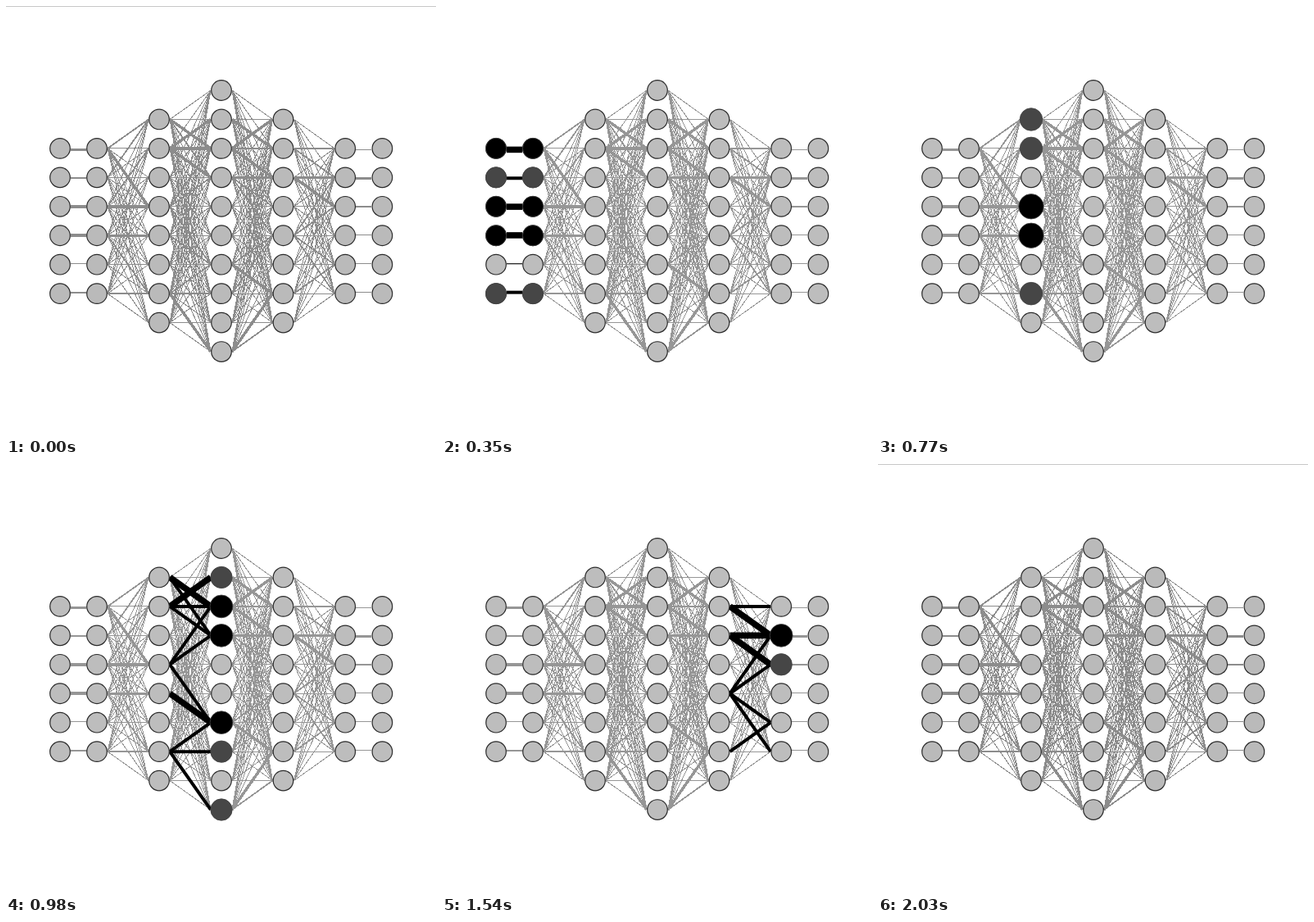
An HTML page that plays this animation: 525x525 px, repeating every 2.1 s.

```html
<!DOCTYPE html>
<html lang="en">
<head>
<meta charset="utf-8">
<title>Neural network pulse</title>
<style>
  html, body { margin: 0; width: 100%; height: 100%; overflow: hidden; background: #fff; }
  svg { display: block; width: 525px; height: 525px; animation: rest 2100ms step-end infinite; }
  .top { stroke: #c8c8c8; opacity: var(--top); }
  .edges { stroke: var(--line); shape-rendering: crispEdges; }
  .nodes { fill: var(--fill); stroke: #2a2a2a; stroke-width: 1.2; }
  .flow { stroke: #000; visibility: hidden; animation: flow 2100ms step-end infinite; }
  .lit { visibility: hidden; animation: show 2100ms step-end infinite; }
  .lit.last { animation-name: show-last; }
  .lit circle {
    --grow: 1.7; r: 12.6px; fill: #464646; stroke: #444; stroke-width: .8;
    animation: swell 2100ms step-end infinite; animation-delay: inherit;
  }
  .lit .strong { --grow: 3.7; fill: #000; }

  /* one picture step is a thirtieth of the loop */
  @keyframes rest {
    0%, 96.66% { --line: #8c8c8c; --fill: #bababa; --top: 1; }
    3.33% { --line: #969696; --fill: #bdbdbd; --top: 0; }
  }
  @keyframes flow { 0% { visibility: visible; } 9.99%, 100% { visibility: hidden; } }
  @keyframes show { 0% { visibility: visible; } 16.66%, 100% { visibility: hidden; } }
  @keyframes show-last { 0% { visibility: visible; } 13.33%, 100% { visibility: hidden; } }
  @keyframes swell {
    0%, 13.33%, 100% { r: 12.6px; }
    3.33% { r: calc(12.6px + .35px * var(--grow)); }
    6.66% { r: calc(12.6px + .7px * var(--grow)); }
    9.99% { r: calc(12.6px + 1px * var(--grow)); }
  }
</style>
</head>
<body>
<svg viewBox="0 0 525 525" fill="none">
  <path class="top" d="M0 .5H525"/>
</svg>
<script>
const svg = document.querySelector('svg');
const STEP = 70;
const layers = [
  { x: 66, rows: [2, 7], lit: '2* 3 4* 5* 7' },
  { x: 111, rows: [2, 7], lit: '2* 3 4* 5* 7' },
  { x: 187, rows: [1, 8], lit: '1 2 4* 5* 7' },
  { x: 263, rows: [0, 9], lit: '1 2* 3* 6* 7 9' },
  { x: 338.5, rows: [1, 8], lit: '2 3* 5 7' },
  { x: 414.2, rows: [2, 7], lit: '3* 4' },
  { x: 459.4, rows: [2, 7], lit: '3* 4' }
];

// Each pair is start row and end row; + marks a heavy weight, * a strong signal.
const weights = [
  '22+* 33 44+* 55+* 77',
  '21 24+* 31 42 44+ 55+* 57 77',
  '12+* 13 21+* 22+ 23+ 42 43 46 56* 76 77 79+',
  '12+ 21+ 22 23+* 33+* 34 35 65 67+ 75 97+ 98',
  '22 23* 33+* 34+* 53 54 56 57 76',
  '33+* 44'
];

const rowY = k => 103 + 35.45 * k;
const rowsOf = ({ rows: [a, b] }) => Array.from({ length: b - a + 1 }, (_, i) => a + i);

function add(parent, tag, attrs) {
  const el = document.createElementNS('http://www.w3.org/2000/svg', tag);
  for (const name in attrs) el.setAttribute(name, attrs[name]);
  return parent.appendChild(el);
}

function group(name, step) {
  const g = add(svg, 'g', { class: name });
  if (step !== undefined) g.style.animationDelay = step * STEP + 'ms';
  return g;
}

const isOuter = gap => gap === 0 || gap === weights.length - 1;

function addEdge(parent, gap, from, to, width) {
  // the short outer links sit slightly closer to the middle
  const y = k => isOuter(gap) ? 262.3 + (rowY(k) - 262.3) * .983 : rowY(k);
  add(parent, 'line', {
    x1: layers[gap].x + 13, y1: y(from),
    x2: layers[gap + 1].x - 13, y2: y(to),
    'stroke-width': width
  });
}

const edges = group('edges');
weights.forEach((list, gap) => {
  const pairs = list.split(' ');
  const flow = group('flow', 4 + 4 * gap);
  for (const from of rowsOf(layers[gap])) {
    for (const to of rowsOf(layers[gap + 1])) {
      if (isOuter(gap) && from !== to) continue;
      const pair = pairs.find(p => p.startsWith(`${from}${to}`));
      const has = mark => pair && pair.includes(mark);
      addEdge(edges, gap, from, to, has('+') ? 3.5 : pair ? 1.8 : 1);
      if (pair) addEdge(flow, gap, from, to, has('*') ? 7.6 : 4);
      else if (isOuter(gap)) addEdge(flow, gap, from, to, 1);
    }
  }
});

const nodes = group('nodes');
for (const layer of layers) {
  for (const k of rowsOf(layer)) add(nodes, 'circle', { cx: layer.x, cy: rowY(k), r: 12.3 });
}

layers.forEach((layer, i) => {
  const isLast = i === layers.length - 1;
  const lit = group(isLast ? 'lit last' : 'lit', 1 + 4 * i);
  for (const mark of layer.lit.split(' ')) {
    add(lit, 'circle', {
      cx: layer.x, cy: rowY(+mark[0]),
      class: mark.endsWith('*') ? 'strong' : 'weak'
    });
  }
});
</script>
</body>
</html>
```
